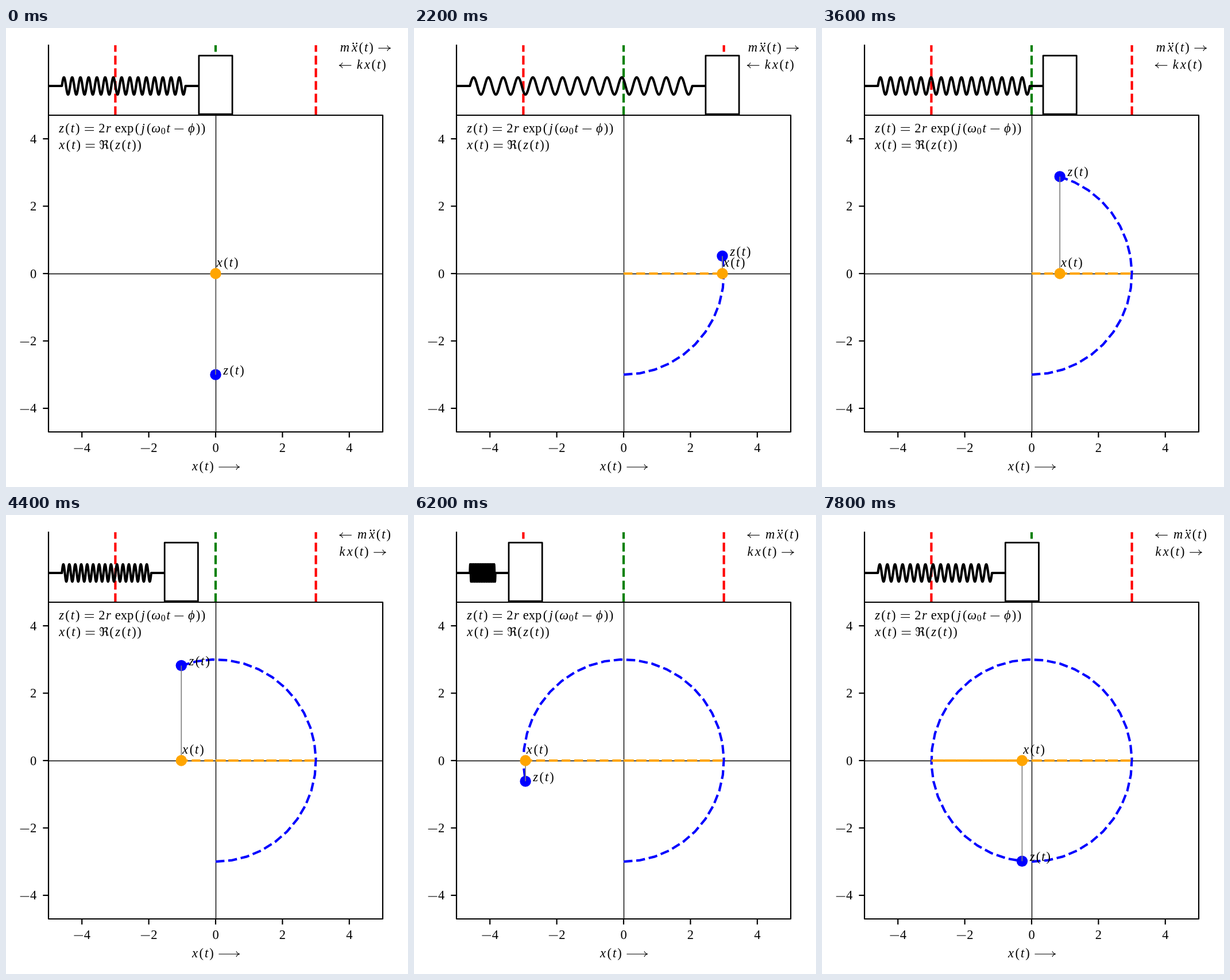
Animation, 700 px wide and 800 px high, one loop 8 s. Source, as an HTML page with a canvas:

```html
<!DOCTYPE html>
<html lang="en">
<head>
<meta charset="utf-8">
<title>Mass on a spring and its phasor</title>
<style>
html, body { margin: 0; width: 100%; height: 100%; overflow: hidden; background: #fff; }
canvas { display: block; width: 700px; height: 800px; }
</style>
</head>
<body>
<canvas id="stage" width="700" height="800"></canvas>
<script>
const ctx = document.getElementById('stage').getContext('2d');
const LOOP = 8000, STEP = 200, TURN = 5 * Math.PI / 99, RADIUS = 3;
const LEFT = 74, RIGHT = 656, TOP = 152, BOTTOM = 704, ROOF = 30;
const THICK = 4.17, DASH = [15.42, 6.67];
const SERIF = '"Liberation Serif", serif';
const SIZE = 22.5, EM = 23.6;

const px = x => 365 + x * 58.2;
const py = y => 428 - y * 58.72;

// Advances in em; '_', '.' and ',' are thick, medium and thin spaces.
const ADVANCE = {
  x: .572, z: .509, t: .361, m: .878, k: .553, r: .479, j: .469, 'ω': .658, 'ϕ': .596,
  'ẍ': .572, '(': .389, ')': .389, '=': .778, '−': .778, exp: 1.528, 'ℜ': .722, '₀': .4,
  '→': 1, '←': 1, '⟶': 1.638, _: .278, '.': .222, ',': .167
};
const advance = token => (ADVANCE[token] ?? .5) * EM;

function stroke(points, color, width, dash = []) {
  ctx.beginPath();
  points.forEach(([x, y]) => ctx.lineTo(x, y));
  ctx.strokeStyle = color;
  ctx.lineWidth = width;
  ctx.setLineDash(dash);
  ctx.stroke();
  ctx.setLineDash([]);
}

function dot(x, y, r, color) {
  ctx.fillStyle = color;
  ctx.beginPath();
  ctx.arc(x, y, r, 0, 7);
  ctx.fill();
}

function glyph(text, x, y, font) {
  ctx.font = font;
  ctx.fillStyle = '#000';
  ctx.textAlign = 'center';
  ctx.fillText(text, x, y);
}

function arrow(tail, tip, y) {
  const d = Math.sign(tip - tail);
  stroke([[tail, y], [tip, y]], '#000', 1.1);
  ctx.beginPath();
  ctx.moveTo(tip - d * 5.5, y - 4.8);
  ctx.quadraticCurveTo(tip - d * 4, y - 1, tip, y);
  ctx.quadraticCurveTo(tip - d * 4, y + 1, tip - d * 5.5, y + 4.8);
  ctx.stroke();
}

function drawToken(token, x, y) {
  const w = advance(token), mid = x + w / 2, axis = y - 5.5;
  const bar = level => stroke([[mid - 7.9, level], [mid + 7.9, level]], '#000', 1.1);
  switch (token) {
    case '_': case '.': case ',': break;
    case '−': bar(axis); break;
    case '=': bar(axis - 2.6); bar(axis + 2.6); break;
    case '→': case '⟶': arrow(x + 1.3, x + w - 1.3, axis); break;
    case '←': arrow(x + w - 1.3, x + 1.3, axis); break;
    case '₀': glyph('0', mid, y + 3.3, `16px ${SERIF}`); break;
    case 'ℜ': glyph(token, mid, y, '21px "DejaVu Sans", sans-serif'); break;
    case 'ẍ':
      glyph('x', mid, y, `italic ${SIZE}px ${SERIF}`);
      dot(mid - 2.4, y - 13.8, 1.3, '#000');
      dot(mid + 3.6, y - 13.8, 1.3, '#000');
      break;
    default: {
      const slant = /^[a-zωϕ]$/.test(token) ? 'italic ' : '';
      glyph(token, mid, y, `${slant}${SIZE}px ${SERIF}`);
    }
  }
}

// Sets a formula; align 0 starts it at x, .5 centres it, 1 ends it there.
function formula(source, x, y, align = 0) {
  const tokens = source.split(' ');
  x -= align * tokens.reduce((sum, token) => sum + advance(token), 0);
  for (const token of tokens) {
    drawToken(token, x, y);
    x += advance(token);
  }
}

function drawSpring(mass) {
  const start = LEFT + 23.3, end = px(mass - .5) - 23.3, points = [[LEFT, 101]];
  for (let i = 0; i <= 600; i++) {
    const u = i / 600;
    points.push([start + u * (end - start), 101 - 15 * Math.sin(u * 30 * Math.PI)]);
  }
  points.push([px(mass - .5), 101]);
  stroke(points, '#000', THICK);
}

function drawTrack(mass) {
  ctx.save();
  ctx.beginPath();
  ctx.rect(LEFT, ROOF, RIGHT - LEFT, TOP - ROOF);
  ctx.clip();
  for (const [x, color] of [[-3, 'red'], [0, 'green'], [3, 'red']]) {
    stroke([[px(x), TOP], [px(x), ROOF]], color, THICK, DASH);
  }
  drawSpring(mass);
  ctx.fillStyle = '#fff';
  ctx.strokeStyle = '#000';
  ctx.lineWidth = 2.78;
  ctx.beginPath();
  ctx.rect(px(mass - .5), 48.2, 58.2, 102);
  ctx.fill();
  ctx.stroke();
  ctx.restore();

  const pulled = mass >= 0;
  formula(pulled ? 'm ẍ ( t ) _ →' : '← _ m ẍ ( t )', 579.5, 40.7);
  formula(pulled ? '← _ k x ( t )' : 'k x ( t ) _ →', 579, 70.7);
}

function drawAxes() {
  stroke([[LEFT, ROOF - 1], [LEFT, TOP]], '#000', 2.2);
  ctx.strokeRect(LEFT, TOP, RIGHT - LEFT, BOTTOM - TOP);
  for (const v of [-4, -2, 0, 2, 4]) {
    const label = (v < 0 ? '− ' : '') + Math.abs(v);
    stroke([[px(v), BOTTOM], [px(v), BOTTOM + 9.7]], '#000', 2.2);
    stroke([[LEFT, py(v)], [LEFT - 9.7, py(v)]], '#000', 2.2);
    formula(label, px(v), 738.5, .5);
    formula(label, 53.5, py(v) + 7.5, 1);
  }
  formula('x ( t ) _ ⟶', px(0), 770.7, .5);
}

function drawPlane(step) {
  const trail = [];
  for (let i = 0; i <= step; i++) {
    trail.push([px(RADIUS * Math.sin(i * TURN)), py(-RADIUS * Math.cos(i * TURN))]);
  }
  const [x, y] = trail[step], zero = py(0);

  stroke([[LEFT, 428.5], [RIGHT, 428.5]], '#000', 1.39);
  stroke([[365.5, TOP], [365.5, BOTTOM]], '#000', 1.39);
  stroke(trail, 'blue', THICK, DASH);
  dot(x, y, 9.7, 'blue');
  stroke([[x, y], [x, zero]], 'gray', 1.7);
  stroke(trail.map(p => [p[0], zero]), 'orange', THICK, DASH);
  dot(x, zero, 9.7, 'orange');

  drawAxes();
  formula('z ( t ) _ = _ 2 r , exp ( j ( ω ₀ t . − . ϕ ) )', 90.5, 181.5);
  formula('x ( t ) _ = _ ℜ ( z ( t ) )', 90.5, 210.8);
  formula('x ( t )', x, zero - 12);
  formula('z ( t )', x + 11.6, y - .5);
}

function draw() {
  const step = Math.floor(performance.now() % LOOP / STEP);
  ctx.fillStyle = '#fff';
  ctx.fillRect(0, 0, 700, 800);
  ctx.lineJoin = 'round';
  drawTrack(RADIUS * Math.sin(step * TURN));
  drawPlane(step);
  requestAnimationFrame(draw);
}
draw();
</script>
</body>
</html>
```
